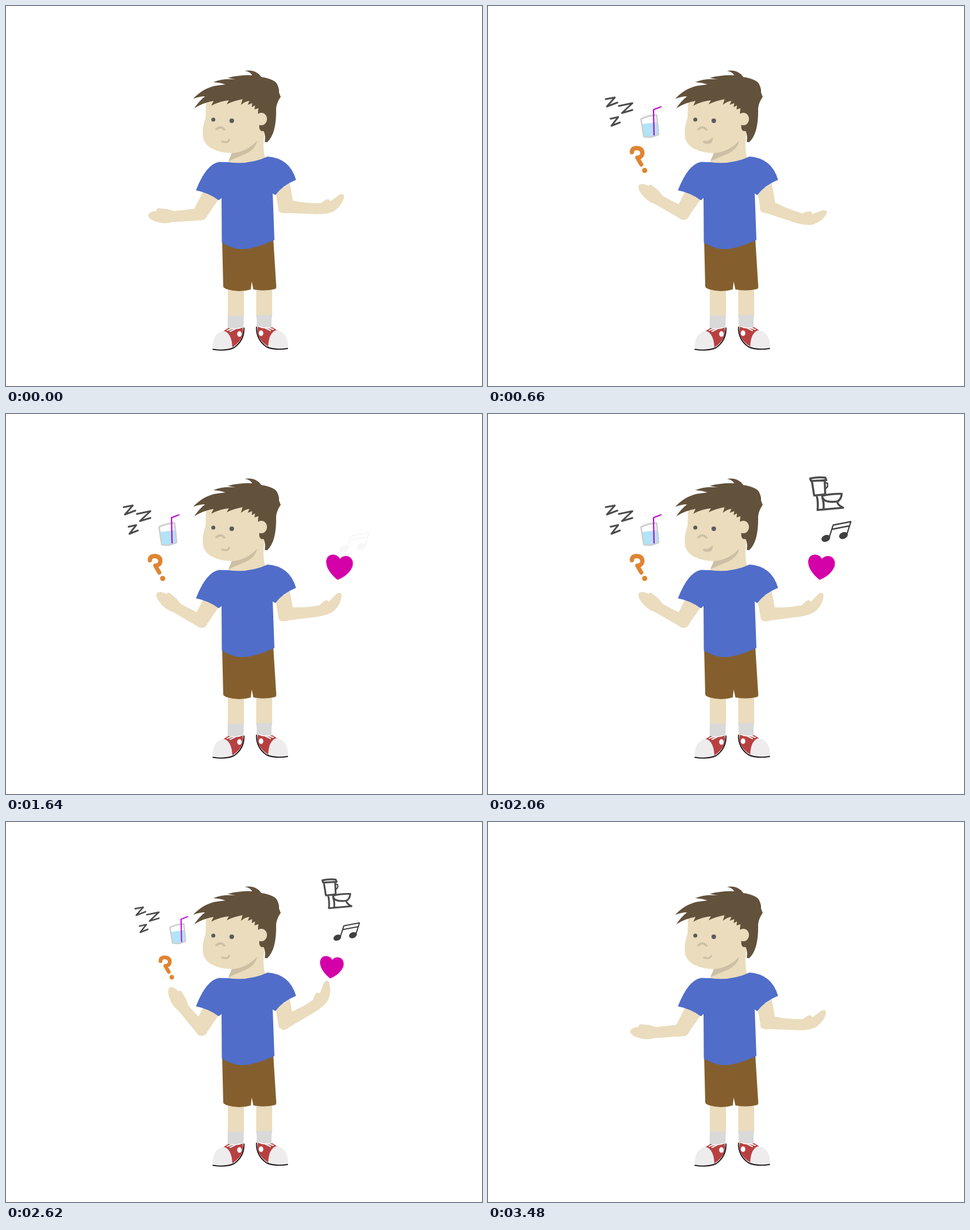
An HTML page with a canvas that plays this animation: 837x669 px, repeating every 3500 ms.

```html
<!DOCTYPE html>
<html lang="en">
<head>
<meta charset="utf-8">
<title>Boy with open hands</title>
<style>
html, body { margin: 0; width: 100%; height: 100%; overflow: hidden; background: #fff; }
canvas { display: block; }
</style>
</head>
<body>
<canvas id="stage" width="837" height="669"></canvas>
<script>
const ctx = document.getElementById('stage').getContext('2d');
const LOOP = 3500;
const SKIN = '#eadcbd', SHADE = '#cdbfa3', HAIR = '#62523c', SHIRT = '#506dc9',
      SHORTS = '#845f2d', SOCK = '#d9d9d9', RED = '#b94040', TOE = '#eeeced', INK = '#4c4c4c';

const fill = (color, d) => {
  ctx.fillStyle = color;
  ctx.fill(new Path2D(d));
};
const line = (color, width, d) => {
  ctx.strokeStyle = color;
  ctx.lineWidth = width;
  ctx.stroke(new Path2D(d));
};
const oval = (color, x, y, rx, ry = rx, turn = 0) => {
  ctx.fillStyle = color;
  ctx.beginPath();
  ctx.ellipse(x, y, rx, ry, turn, 0, Math.PI * 2);
  ctx.fill();
};
const box = (color, x, y, w, h) => {
  ctx.fillStyle = color;
  ctx.fillRect(x, y, w, h);
};

const linear = p => p;
const smooth = p => p * p * (3 - 2 * p);
const clamp = p => Math.min(1, Math.max(0, p));

// Interpolates [time, value] keys
function track(t, keys, ease = smooth) {
  let [t0, v0] = keys[0];
  for (const [t1, v1] of keys) {
    if (t < t1) return t <= t0 ? v0 : v0 + (v1 - v0) * ease((t - t0) / (t1 - t0));
    t0 = t1;
    v0 = v1;
  }
  return v0;
}

function rotated(x, y, degrees, draw) {
  ctx.save();
  ctx.translate(x, y);
  ctx.rotate(degrees * Math.PI / 180);
  ctx.translate(-x, -y);
  draw();
  ctx.restore();
}

function leftArm(angle) {
  fill(SKIN, 'M348 324 L376 337 L350 375 L334 362 L331 357 Z');
  oval(SKIN, 344, 366, 10.5);
  rotated(345, 367, angle, () => fill(SKIN,
    'M331 357 L296 361 Q288 359 284 357.5 L268 356 Q264 357 265 360.5 Q251 362 250 369 ' +
    'Q251 375 262 379 Q278 385 292 380.5 L346 377 Q350 376 351 370 Z'));
}

function rightArm(angle) {
  fill(SKIN, 'M474 328 L499 312 L505 346 L490 365 L480 362 Z');
  oval(SKIN, 490, 354, 11);
  rotated(490, 354, angle, () => fill(SKIN,
    'M504 342.5 Q530 348 554 347 Q561 341 566 340 Q570 341 570 344 Q580 337 585 333 ' +
    'Q594 328 594.5 336 Q592 350 577 361 Q566 367 546 366.5 L484 364 Q478 363 479 355 Z'));
}

function shoe() {
  fill('#fff', 'M384 573 L416 565 Q424 588 400 604 L366 605 Z');
  fill(RED, 'M381 573 L391 567 Q404 572 416 566 Q421 586 398 601 L388 600 Z');
  fill(TOE, 'M363 604 Q363 575 383 572 Q397 576 398 601 Q381 606 363 604 Z');
  oval('#fff', 410.5, 577.5, 4, 5);
  line('#f4f2f2', 2, 'M389 571 L399 567.5 M394 573 L403 568.5');
  line('#201c1c', 2, 'M364 604.5 Q387 608 401 601.5 Q419 589 418.5 567');
}

function legs() {
  box(SKIN, 390, 490, 28.5, 58);
  box(SKIN, 440, 490, 28, 58);
  fill(SOCK, 'M390 545 H418 L417.5 568 H389.5 Z');
  fill(SOCK, 'M440.5 544 H467 V566 H441 Z');
  shoe();
  ctx.save();
  ctx.translate(859, -1.5);
  ctx.scale(-1, 1);
  shoe();
  ctx.restore();
  fill(SHORTS, 'M380 410 L382 494 Q383 497 390 499 Q410 505 430.5 499 L432 485 L435 499 ' +
    'Q455 503 474 498 Q476 495 475 490 L470 410 Z');
}

function shirt() {
  fill(SHIRT, 'M375 274.5 L391 275 Q428 280 460 265 Q499 268 510 306 Q486 316 473.5 333 ' +
    'L469 330 L472 412 C451 421 432 428 416 428 C400 428 390 422 379.5 416.5 L379 338 L374 342 ' +
    'Q357 329 334 324.5 Q352 278 375 274.5 Z');
}

function head(open) {
  fill(SKIN, 'M352 160 L351 196 Q345 214 346 227 Q347 243 362 251 Q378 259 398 259 ' +
    'L390 276 Q420 281 456 268 Q450 250 455 222 L455 160 Z');
  fill(SHADE, 'M397 259 Q424 257 441.5 237 Q440 250 424 259 Q408 266 391 273 Z');
  fill(HAIR, 'M329 163.5 Q346 145 368 140.5 L386 138 Q377 135 364.5 134 Q382 127 404 129.5 L390 126.5 ' +
    'Q412 121 433 122 Q430 116 420 114 Q440 111 449 125 Q473 129 477 138 Q481 147 480 152 ' +
    'L483 160 Q476 170 475 180 Q476 225 459 240 L455 239 Q457 228 453 220 Q444 222 445.5 209 ' +
    'L443 187 L444 180 L437 182 L438 175 L432 178 L433 171 L425 174 L428 167 Q420 168 413 174 ' +
    'L416 164 Q400 167 388 173 L392 166 Q374 168 361 175.5 L365 167 Q347 170 331 180 ' +
    'Q339 168 350 159 Q340 159 329 163.5 Z');
  oval(SKIN, 449, 199, 10, 11);
  oval('#5d5b57', 364.5, 200, 3.5);
  oval('#5d5b57', 397, 202, 4);
  line(SHADE, 3.8, 'M370 217 Q377 210 384 217.5');
  line(SHADE, 3, 'M380 238.5 Q390 242 392.5 235.5');
  if (open > 0) {
    const left = 380 - 2 * open, right = 393 + 2 * open;
    fill(SHADE, `M${left} 238 Q387 239.5 ${right} ${235 - 3.5 * open} ` +
      `Q${right + 1} 243 385 243 Q${left} 242 ${left} 238 Z`);
  }
}

function question() {
  line('#e08431', 7.4, 'M253 257.5 Q253 250 262 250 Q272 251 271.5 260 Q270 267 262.5 267 L269.5 279');
  oval('#e08431', 275.5, 289.5, 4.5);
}

function glass() {
  fill('#b1e3fa', 'M271 208 L299 204 L300.5 226 Q288 233 274 230 Z');
  line('#cfcfcf', 2.8, 'M269 199 L274 230 Q288 233 300 226 L296.5 192 Q283 192 269 199 Z');
  line('#b800d8', 2.2, 'M292 227 L291 182.5 L304 177.5');
}

function snooze() {
  line(INK, 3, 'M207 164 L223 161 L209 177 L227.5 170 M230 176 L254 171 ' +
    'L235.5 188.5 L254 183 M215.5 198.5 L229 195.5 L217 211 L232 205');
}

function heart() {
  fill('#d400a8', 'M583 292 Q562 275 563 258 Q565 247 576 247.5 Q585 249 587 255 ' +
    'Q594 248 603 251 Q612 256 609.5 268 Q603 284 583 292 Z');
}

function notes() {
  oval('#404040', 594, 219, 8, 5.8, -0.4);
  oval('#404040', 625, 214, 8, 5.8, -0.4);
  line('#404040', 2.3, 'M600 217 L607 195.5 L638 189.5 L631 212 M604.5 203 L635.5 197');
}

function toilet() {
  line(INK, 3.6, 'M566.5 113.5 Q580 110.5 593 112 L595 116.5 L568 118 Z ' +
    'M569.5 118 L573.5 143.5 L593 141.5 L592 117 M578 143.5 Q581 156 579.5 169 L624.5 165 Q615 161 614 154 ' +
    'M587.5 144 Q603 140 622 140.5 Q621 151 614 154 Q600 156 592 152 Q588 149 587.5 144 Z ' +
    'M588 148 Q591 156 590 168');
  line(INK, 2.5, 'M594 121 L597 122 L597 128 L594 131');
}

// Each icon scales about its own centre
const icons = [
  { draw: question, x: 263, y: 270, start: 340, side: 17.5 },
  { draw: glass, x: 285, y: 205, start: 425, side: 17.5 },
  { draw: snooze, x: 231, y: 187, start: 515, side: 17.5 },
  { draw: heart, x: 586.5, y: 269.5, start: 1500, side: -13.5 },
  { draw: notes, x: 612, y: 207, start: 1625, side: -13.5 },
  { draw: toilet, x: 595, y: 141, start: 1685, side: -13.5 }
];

function drawIcon({ draw, x, y, start, side }, t, lift) {
  const shown = clamp((t - start) / 130);
  const gone = clamp((t - 2560) / 180);
  if (shown === 0 || gone === 1) return;
  const size = 1 - gone * gone;
  ctx.save();
  ctx.globalAlpha = smooth(shown);
  ctx.translate(x + side * lift, y - 14 * lift + 20 * (1 - smooth(shown)));
  ctx.scale(size, size);
  ctx.translate(-x, -y);
  draw();
  ctx.restore();
}

function render(t) {
  const lift = track(t, [[2220, 0], [2260, 0.57], [2340, 1.08], [2480, 1.2], [2620, 1]], linear);
  const drop = 1 - track(t, [[2620, 0], [2940, 1]]);
  const left = track(t, [[20, 0], [340, 34]]) + 20 * lift;
  const right = track(t, [[20, 0], [340, 16], [1160, 16], [1310, 32.5], [1520, -9.5]]) - 23.5 * lift;
  const open = track(t, [[580, 0], [650, 1], [1160, 1], [1220, 0], [1720, 0], [1800, 1],
    [2140, 1], [2220, 0], [2780, 0], [2940, 1], [3479, 1], [3480, 0]]);

  ctx.fillStyle = '#fff';
  ctx.fillRect(0, 0, 837, 669);
  legs();
  leftArm(left * drop);
  rightArm(right * drop);
  head(open);
  shirt();
  for (const icon of icons) drawIcon(icon, t, lift);
}

ctx.lineCap = ctx.lineJoin = 'round';
const begin = performance.now();
function frame() {
  render((performance.now() - begin) % LOOP);
  requestAnimationFrame(frame);
}
frame();
</script>
</body>
</html>
```
